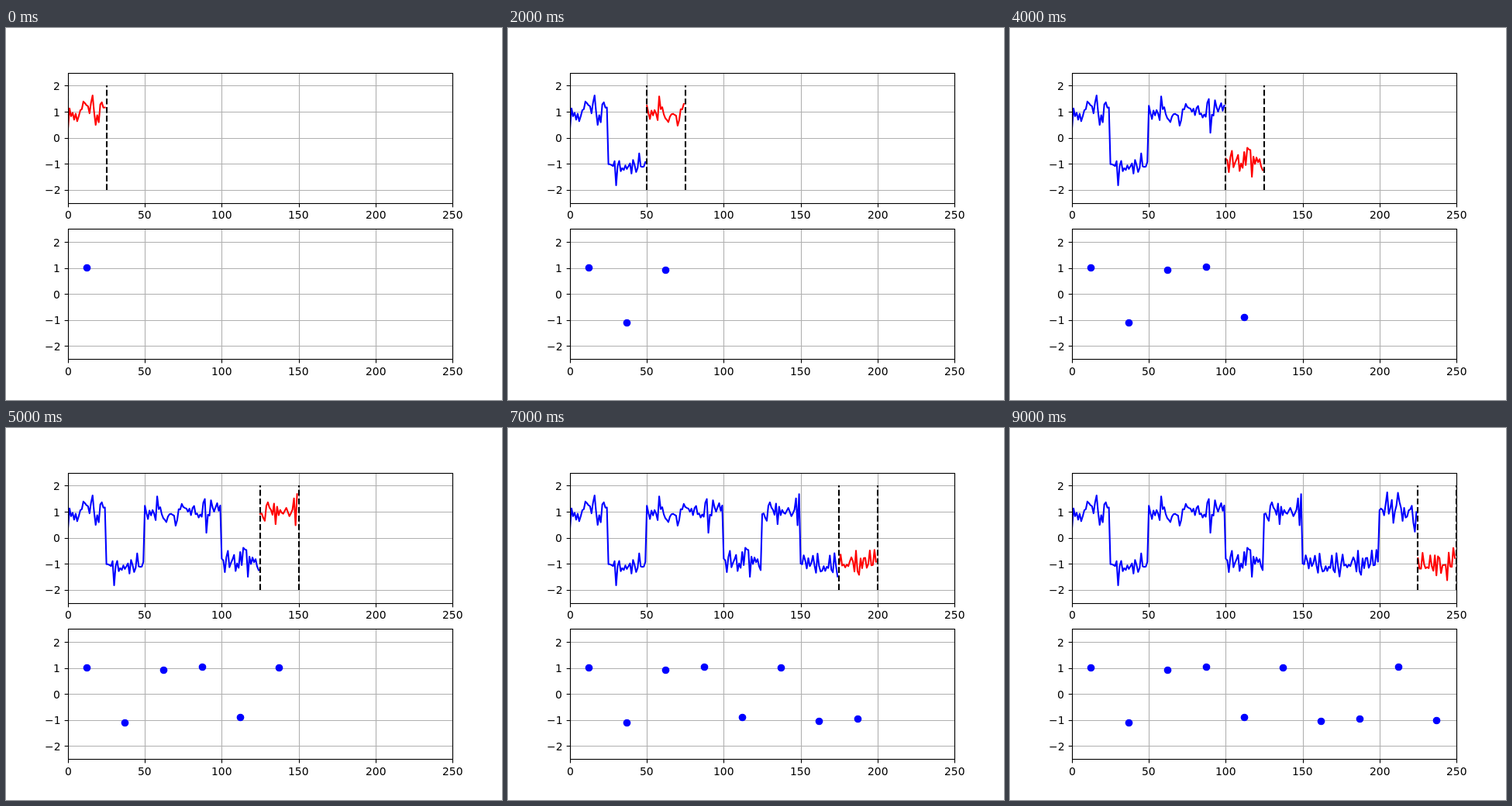
An HTML page for the animation above (10000 ms loop, 640x480 px).

```html
<!DOCTYPE html>
<html lang="en">
<head>
<meta charset="utf-8">
<title>Windowed mean</title>
<style>
  html, body { margin: 0; width: 100%; height: 100%; overflow: hidden; background: #fff; }
  svg { display: block; }
  text { font: 13.89px "DejaVu Sans", sans-serif; }
  .grid { stroke: #b0b0b0; stroke-width: 1.11; }
  .frame { fill: none; stroke: #000; stroke-width: 1.11; }
  .signal { fill: none; stroke-width: 2.08; stroke-linejoin: round; stroke-linecap: square; }
  .edge { stroke: #000; stroke-width: 2.08; stroke-dasharray: 7.71 3.33; }
</style>
</head>
<body>
<svg id="stage" width="640" height="480" viewBox="0 0 640 480"></svg>
<script>
const stage = document.getElementById('stage');
const LEFT = 80, RIGHT = 576, HEIGHT = 168, TOPS = [57.6, 259.2];
const STEP = 1000, WINDOW = 25, TICK = 4.86;

// Each window of the signal is noise around its own mean.
const means = [1.02, -1.1, 0.93, 1.05, -0.89, 1.02, -1.04, -0.95, 1.05, -1];
const SPREAD = 0.3;

const xAt = i => LEFT + i * (RIGHT - LEFT) / 250;
const yAt = (v, panel) => TOPS[panel] + HEIGHT / 2 - v * HEIGHT / 5;
const crisp = p => Math.round(p) + 0.5;

function add(tag, attrs, text = '') {
  const node = document.createElementNS('http://www.w3.org/2000/svg', tag);
  for (const key in attrs) node.setAttribute(key, attrs[key]);
  node.textContent = text;
  return stage.appendChild(node);
}

function line(x1, y1, x2, y2, cls) {
  return add('line', { x1, y1, x2, y2, class: cls });
}

// Aligns by a share of the text width and snaps to whole pixels.
function label(text, x, y, share) {
  const node = add('text', { y: Math.round(y) }, text);
  node.setAttribute('x', Math.round(x - node.getComputedTextLength() * share));
}

function makeSignal() {
  let seed = 11;
  const random = () => (seed = seed * 16807 % 2147483647) / 2147483647;
  const noise = () => (random() + random() + random() + random() - 2) * Math.sqrt(3) * SPREAD;
  return means.flatMap(mean => {
    const samples = Array.from({ length: WINDOW }, noise);
    const offset = samples.reduce((sum, v) => sum + v) / WINDOW;
    return samples.map(v => mean + v - offset);
  });
}

const points = makeSignal().map((v, i) => xAt(i).toFixed(2) + ',' + yAt(v, 0).toFixed(2));

const clip = add('clipPath', { id: 'plot' });
clip.append(add('rect', { x: LEFT, y: 58, width: RIGHT - LEFT, height: HEIGHT }));

TOPS.forEach((top, panel) => {
  const bottom = top + HEIGHT;
  for (let i = 0; i <= 250; i += 50) {
    const x = crisp(xAt(i));
    line(x, crisp(top), x, crisp(bottom), 'grid');
    line(x, crisp(bottom), x, crisp(bottom) + TICK, 'frame');
    label(i, xAt(i), bottom + 20.7, 0.5);
  }
  for (let v = -2; v <= 2; v++) {
    const y = crisp(yAt(v, panel));
    line(LEFT, y, RIGHT, y, 'grid');
    line(LEFT + 0.5 - TICK, y, LEFT + 0.5, y, 'frame');
    label(String(v).replace('-', '\u2212'), LEFT - 2 * TICK, yAt(v, panel) + 5.5, 1);
  }
});

const clipped = { 'clip-path': 'url(#plot)' };
const past = add('polyline', { class: 'signal', stroke: '#00f', ...clipped });
const current = add('polyline', { class: 'signal', stroke: '#f00', ...clipped });

const edges = [0, 1].map(() => add('line', {
  y1: Math.round(yAt(-2, 0)), y2: Math.round(yAt(2, 0)), class: 'edge', ...clipped
}));

const dots = means.map((mean, k) => add('circle', {
  cx: crisp(xAt(k * WINDOW + 12)), cy: crisp(yAt(mean, 1)), r: 4.86, fill: '#00f'
}));

for (const top of TOPS) {
  add('rect', {
    x: LEFT + 0.5, y: crisp(top), width: RIGHT - LEFT,
    height: crisp(top + HEIGHT) - crisp(top), class: 'frame'
  });
}

function show(k) {
  const start = k * WINDOW, end = start + WINDOW;
  past.setAttribute('points', points.slice(0, start).join(' '));
  current.setAttribute('points', points.slice(start, end).join(' '));
  edges.forEach((edge, n) => {
    const x = Math.round(xAt(n ? end : start));
    edge.setAttribute('x1', x);
    edge.setAttribute('x2', x);
  });
  dots.forEach((dot, n) => dot.setAttribute('visibility', n <= k ? 'visible' : 'hidden'));
}

let shown = 0;
function tick(now) {
  const k = Math.floor(now / STEP) % means.length;
  if (k !== shown) show(shown = k);
  requestAnimationFrame(tick);
}
show(0);
requestAnimationFrame(tick);
</script>
</body>
</html>
```
